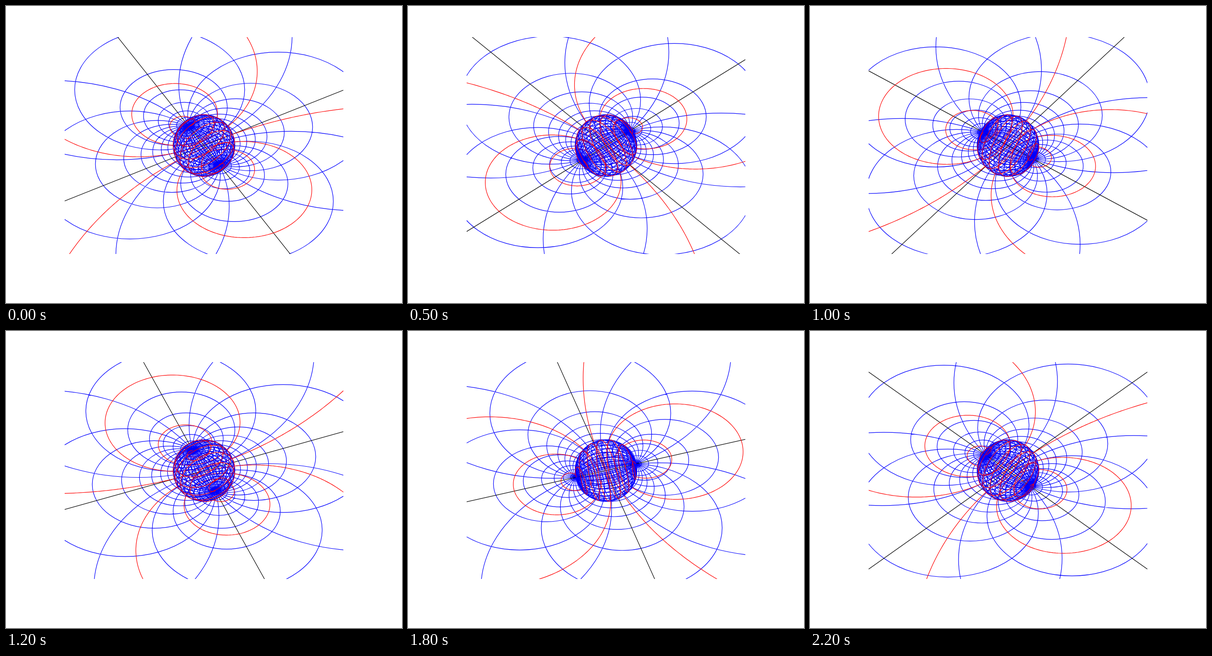
Write an HTML page with a canvas that moves like this. It is 864 by 648 pixels and loops after 2300 ms.

```html
<!DOCTYPE html>
<html lang="en">
<head>
<meta charset="utf-8">
<title>Stereographic sphere grid</title>
<style>
html, body { margin: 0; width: 100%; height: 100%; overflow: hidden; background: #fff; }
canvas { display: block; }
</style>
</head>
<body>
<canvas id="stage" width="864" height="648"></canvas>
<script>
const ctx = document.getElementById('stage').getContext('2d');
const STEPS = 23, STEP_MS = 100;
const CX = 432, CY = 304.5, R = 67.5;
const TILT = Math.SQRT1_2; // sine and cosine of the 45° elevation
const RAD = Math.PI / 180;
const BLUE = '#00f', RED = '#f00', BLACK = '#000';

let cosA = 1, sinA = 0;

// u runs along the polar axis, v across it in the plane, w upwards.
function project([u, v, w]) {
  const x = u * cosA - v * sinA;
  const y = u * sinA + v * cosA;
  return [CX + R * x, CY - R * TILT * (y + w)];
}

// Point on the unit sphere from axial height s and longitude.
function onSphere(s, lon) {
  const c = Math.sqrt(Math.max(0, 1 - s * s));
  return [s, c * Math.sin(lon), -c * Math.cos(lon)];
}

// Stereographic image of a sphere point, seen from the top.
function onPlane([u, v, w]) {
  const k = 1 / Math.max(1e-6, 1 - w);
  return [u * k, v * k, 0];
}

function curve(points) {
  points.forEach((p, i) => {
    const [x, y] = project(p);
    if (i) ctx.lineTo(x, y);
    else ctx.moveTo(x, y);
  });
}

function planeCircle(u, v, r) {
  const [x, y] = project([u, v, 0]);
  ctx.moveTo(x + r * R, y);
  ctx.ellipse(x, y, r * R, r * R * TILT, 0, 0, 2 * Math.PI);
}

function stroke(color, build) {
  ctx.strokeStyle = color;
  ctx.beginPath();
  build();
  ctx.stroke();
}

const range = (n, f) => Array.from({ length: n + 1 }, (_, i) => f(i));

// Grid lines and the six-turn spiral on the sphere.
const parallels = range(16, i => {
  const s = Math.sin((i * 10 - 80) * RAD);
  return range(90, j => onSphere(s, j * 4 * RAD));
});
const meridians = range(35, i =>
  range(60, j => onSphere(Math.sin((j * 3 - 90) * RAD), i * 10 * RAD)));
const spiral = range(3600, i => {
  const s = i / 1800 - 1;
  return onSphere(s, (1080 * s - 90) * RAD);
});
const flatSpiral = spiral.map(onPlane);

function planeGrid() {
  for (let deg = 10; deg <= 90; deg += 10) {
    const sin = Math.sin(deg * RAD), cot = Math.cos(deg * RAD) / sin;
    for (const side of [-1, 1]) {
      if (deg < 90) planeCircle(side / sin, 0, cot);
      if (deg < 90 || side > 0) planeCircle(0, side * cot, 1 / sin);
    }
  }
}

function planeAxes() {
  curve([[-9, 0, 0], [9, 0, 0]]);
  curve([[0, -9, 0], [0, 9, 0]]);
}

function draw(step) {
  const angle = (135 - 360 * (step + 1) / STEPS) * RAD;
  cosA = Math.cos(angle);
  sinA = Math.sin(angle);

  ctx.fillStyle = '#fff';
  ctx.fillRect(0, 0, 864, 648);
  ctx.save();
  ctx.beginPath();
  ctx.rect(128, 68, 608, 473);
  ctx.clip();
  ctx.lineWidth = 1.2;
  ctx.lineJoin = 'round';
  stroke(BLUE, planeGrid);
  stroke(BLACK, planeAxes);
  stroke(RED, () => curve(flatSpiral));
  stroke(BLUE, () => [...parallels, ...meridians].forEach(curve));
  stroke(RED, () => curve(spiral));
  ctx.restore();
}

let shown = -1;
function tick() {
  const step = Math.floor(performance.now() / STEP_MS) % STEPS;
  if (step !== shown) draw(shown = step);
  requestAnimationFrame(tick);
}
tick();
</script>
</body>
</html>
```
